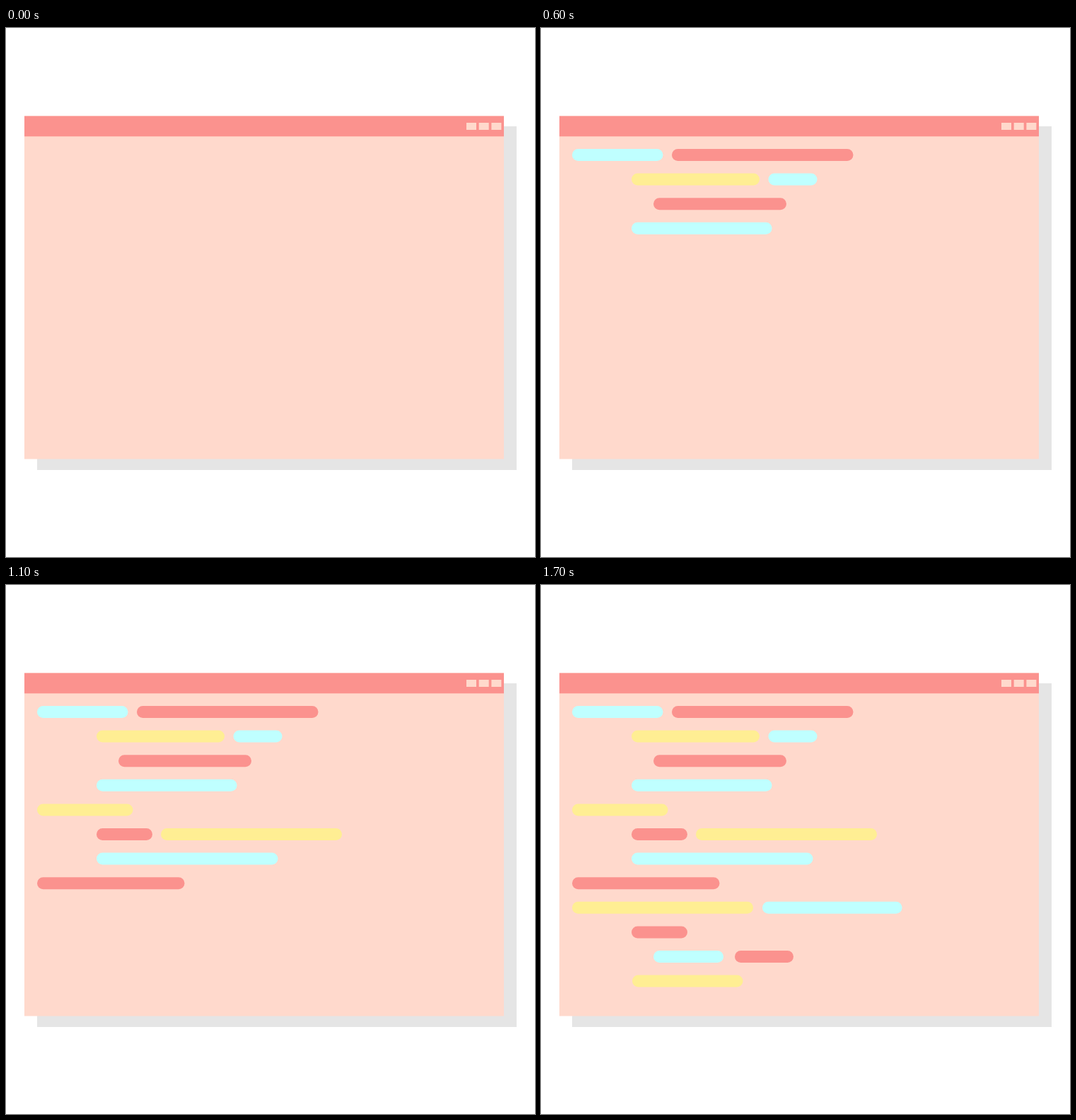
Recreate the animation shown at these times as an HTML page. Size 748 by 748 pixels, loop 1800 ms.

```html
<!DOCTYPE html>
<html lang="en">
<head>
<meta charset="utf-8">
<title>Code window</title>
<style>
  html, body { margin: 0; width: 100%; height: 100%; overflow: hidden; background: #fff; }
  svg { display: block; width: 100vw; height: 100vh; }
</style>
</head>
<body>
<svg id="stage" viewBox="0 0 748 748"></svg>
<script>
const LOOP = 1800, STEP = 100;
const RED = '#fb928e', CYAN = '#bfffff', YELLOW = '#ffee93', PEACH = '#ffd9cc', GREY = '#e5e5e5';
const TOP = 171, PITCH = 34.6, BAR = 17;

// One bar appears per step: row, left, right, colour
const bars = [
  [0, 44, 172.5, CYAN], [0, 185, 441.5, RED],
  [1, 128, 309, YELLOW], [1, 321.5, 390.5, CYAN],
  [2, 159, 347, RED],
  [3, 128, 326.5, CYAN],
  [4, 44, 179.5, YELLOW],
  [5, 128, 207, RED], [5, 219, 475, YELLOW],
  [6, 128, 384.5, CYAN],
  [7, 44, 252.5, RED],
  [8, 44, 300, YELLOW], [8, 313, 510.5, CYAN],
  [9, 128, 207, RED],
  [10, 159, 258, CYAN], [10, 274, 357, RED],
  [11, 129, 285.5, YELLOW]
];

const stage = document.getElementById('stage');

function rect(x, y, width, height, fill, rx = 0) {
  const el = document.createElementNS('http://www.w3.org/2000/svg', 'rect');
  for (const [key, value] of Object.entries({ x, y, width, height, fill, rx })) {
    el.setAttribute(key, value);
  }
  return stage.appendChild(el);
}

rect(44, 139, 678, 486, GREY);
rect(26, 124.5, 678, 485, PEACH);
rect(26, 124.5, 678, 28.8, RED);
for (const x of [651, 668.7, 686.4]) rect(x, 134, 14, 10, PEACH);

bars.forEach(([row, left, right, fill], i) => {
  const bar = rect(left, TOP + row * PITCH, right - left, BAR, fill, BAR / 2);
  // Slightly early, so rounding never delays a step
  const offset = ((i + 1) * STEP - 1) / LOOP;
  bar.animate([
    { opacity: 0, easing: 'step-end' },
    { opacity: 1, offset },
    { opacity: 1 }
  ], { duration: LOOP, iterations: Infinity });
});
</script>
</body>
</html>
```
